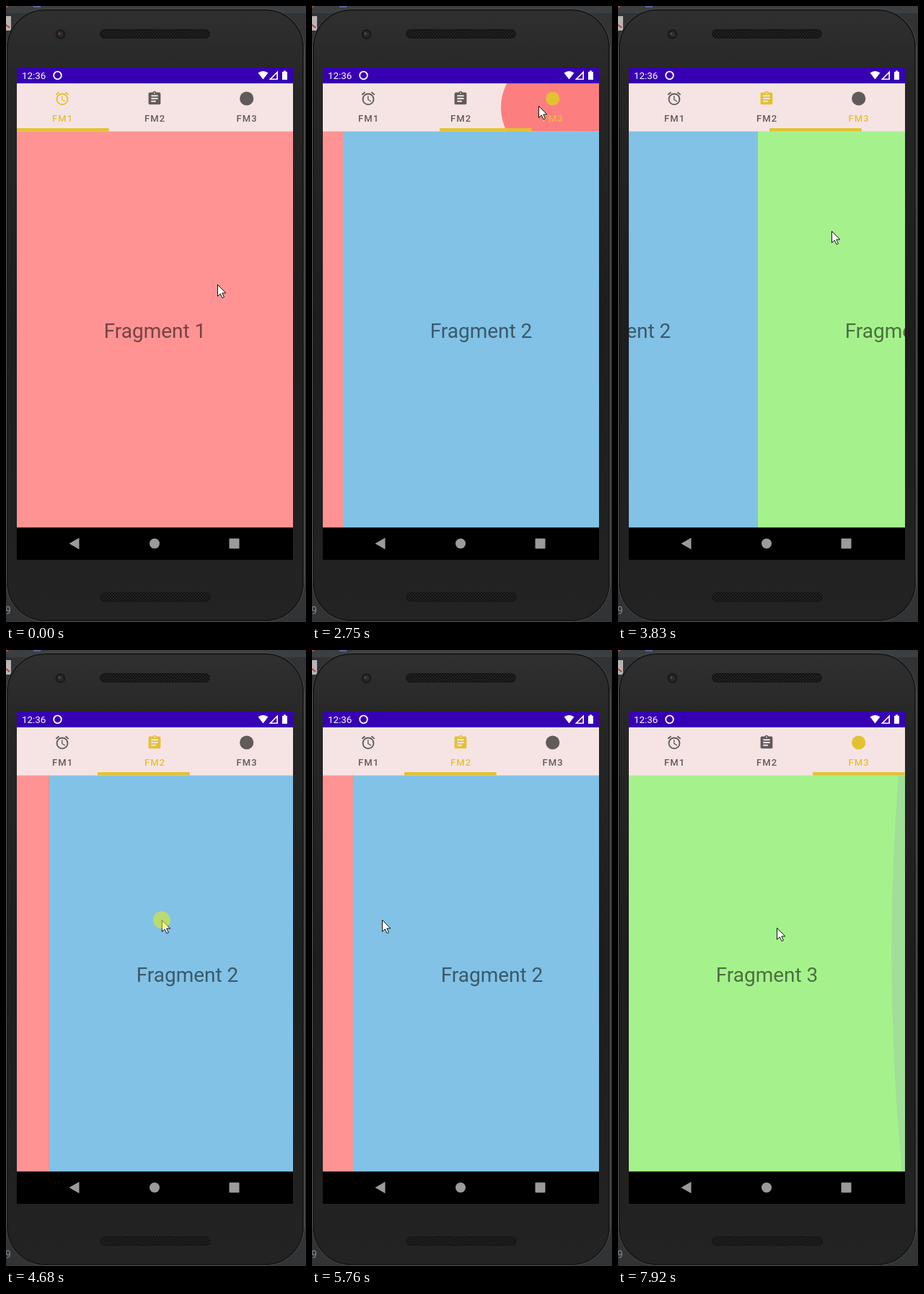
Recreate the animation shown at these times as an HTML page. Size 416x852 px, loop 8000 ms.

```html
<!DOCTYPE html>
<html lang="en">
<head>
<meta charset="utf-8">
<title>Tabbed pager</title>
<style>
  html, body { margin: 0; width: 100%; height: 100%; overflow: hidden; background: #313335; }
  svg { display: block; width: 416px; height: 852px; font-family: Roboto, sans-serif; }
  .page text { font-size: 28px; text-anchor: middle; fill: rgba(0,0,0,.54); }
  .label { font-size: 13px; font-weight: 500; letter-spacing: 1.1px; text-anchor: middle; }
</style>
</head>
<body>
<svg viewBox="0 0 416 852">
  <defs>
    <linearGradient id="body" x2="0" y2="1">
      <stop offset="0" stop-color="#303030"/>
      <stop offset=".12" stop-color="#262626"/>
      <stop offset=".5" stop-color="#1d1d1d"/>
      <stop offset="1" stop-color="#232323"/>
    </linearGradient>
    <pattern id="mesh" width="4" height="4" patternUnits="userSpaceOnUse">
      <rect width="4" height="4" fill="#222"/>
      <circle cx="1" cy="1" r="1" fill="#0c0c0c"/>
      <circle cx="3" cy="3" r="1" fill="#0c0c0c"/>
    </pattern>
    <clipPath id="pagesClip"><rect x="15" y="173.500" width="383" height="548"/></clipPath>
    <clipPath id="tabsClip"><rect x="15" y="107" width="383" height="66.500"/></clipPath>
  </defs>

  <!-- desktop and phone -->
  <rect width="416" height="852" fill="#313335"/>
  <rect width="416" height="10" fill="#3c3f41"/>
  <rect y="14" width="7" height="20" fill="#b9b4b4"/>
  <path d="M0 1h3M0 26l5 4" stroke="#b5453c" stroke-width="2"/>
  <path d="M38 1h10" stroke="#5868a8" stroke-width="2"/>
  <text x="-1" y="841" font-size="14" fill="#85888a">9</text>
  <rect x=".5" y="4" width="413" height="847.500" rx="54" fill="url(#body)" stroke="#5a5a5a"/>
  <rect x="2" y="5.500" width="410" height="844.500" rx="52" fill="none" stroke="#191919" stroke-width="2"/>
  <circle cx="75.500" cy="39" r="7" fill="#1c1c1c"/>
  <circle cx="75.500" cy="39" r="4" fill="#30282c"/>
  <circle cx="74" cy="38" r="1.500" fill="#594b50"/>
  <g fill="url(#mesh)" stroke="#151515">
    <rect x="130.500" y="32.500" width="152" height="12" rx="6"/>
    <rect x="130.500" y="811.500" width="153" height="12" rx="6"/>
  </g>

  <!-- status bar -->
  <rect x="15" y="85" width="383" height="22" fill="#3700b3"/>
  <g fill="#fff">
    <text x="22" y="101" font-size="13.400">12:36</text>
    <circle cx="71.500" cy="96" r="5.300" fill="none" stroke="#fff" stroke-width="1.800"/>
    <path d="M349.500 92.500q7-5 14 0l-7 9z"/>
    <path d="M375.300 93.500v7h-7zM377 89.500v12.500h-12.500z" fill-rule="evenodd"/>
    <path d="M383 91h2v-1.500h3v1.500h2v11h-7z"/>
  </g>

  <!-- tabs -->
  <rect x="15" y="107" width="383" height="67" fill="#f6e4e4"/>
  <circle id="ripple" cx="334" cy="140.500" fill="#fc7e7e" clip-path="url(#tabsClip)"/>
  <g transform="translate(66.800 116.800) scale(.932)"><path class="icon" d="M22 5.720l-4.600-3.860-1.290 1.530 4.600 3.860zM7.880 3.390L6.600 1.860 2 5.710l1.290 1.530zM12.500 8H11v6l4.750 2.850.75-1.230-4-2.370zM12 4a9 9 0 1 0 0 18a9 9 0 0 0 0-18zm0 16a7 7 0 1 1 0-14a7 7 0 0 1 0 14z"/></g>
  <g transform="translate(194.800 116.800) scale(.932)"><path class="icon" fill-rule="evenodd" d="M19 3h-4.180a3 3 0 0 0-5.640 0H5a2 2 0 0 0-2 2v14a2 2 0 0 0 2 2h14a2 2 0 0 0 2-2V5a2 2 0 0 0-2-2zM12 3a1 1 0 0 1 0 2a1 1 0 0 1 0-2zM14 17H7v-2h7zM17 13H7v-2h10zM17 9H7V7h10z"/></g>
  <circle class="icon" cx="333.700" cy="128" r="9.600"/>
  <text class="label" x="78.600" y="160">FM1</text>
  <text class="label" x="206.600" y="160">FM2</text>
  <text class="label" x="334.200" y="160">FM3</text>

  <!-- pages -->
  <g clip-path="url(#pagesClip)">
    <g id="pages"></g>
    <path id="glow" d="M0 0H-9Q-30.500 274-4 548H0z" fill="rgba(140,165,185,.24)"/>
  </g>
  <rect id="indicator" y="169" width="127.670" height="4.500" fill="#e2c233"/>

  <!-- navigation bar -->
  <rect x="15" y="721.500" width="383" height="44.500" fill="#000"/>
  <g fill="#9b9b9b">
    <path d="M87.500 743.500L101.500 735.500V751.500z"/>
    <circle cx="206" cy="743.500" r="7"/>
    <rect x="309.500" y="736.500" width="14" height="14" rx="1"/>
  </g>

  <g id="pointer">
    <path d="M.5.5V16.500l3.700-3.500 2.800 5.700 2.500-1.100-2.700-5.600h5z" fill="#fff" stroke="#111"/>
    <circle id="touch" r="12" fill="rgba(242,242,0,.5)"/>
  </g>
</svg>

<script>
const LOOP = 8000, PAGE_W = 383, LEFT = 15, LAST_PAGE = 2;
const TRAVEL = 400, SETTLE = 300, TAP_SCROLL = 315, TAP_MARKER = 253, LABEL_LAG = 30;

const $ = id => document.getElementById(id);
const set = (el, attrs) => { for (const k in attrs) el.setAttribute(k, attrs[k]); };
const mix = (a, b, u) => a + (b - a) * u;
const progress = (t, start, length) => Math.min(1, Math.max(0, (t - start) / length));
const smooth = u => u * u * (3 - 2 * u);
const slowDown = u => 1 - (1 - u) ** 3;

// Pointer strokes; those with a page press the screen and end on that page.
const strokes = [
  { start: 600, end: 1440, from: [293, 385], to: [310, 141] },
  { start: 2220, end: 2370, from: [318, 96], to: [320, 132] },
  { start: 2520, end: 2600, from: [314, 138], to: [314, 138], page: 2, tap: true },
  { start: 3480, end: 3828, from: [117, 322], to: [296, 311], page: 1 },
  { start: 4590, end: 4800, from: [171, 375], to: [296, 370], page: 0 },
  { start: 5400, end: 5637, from: [296, 370], to: [97, 373], page: 1 },
  { start: 6790, end: 7022, from: [283, 390], to: [62, 387], page: 2 },
  { start: 7600, end: 7770, from: [284, 392], to: [82, 398], page: 2 },
  { start: 7909, end: LOOP, from: [220, 384], to: [220, 384] }
];
const touches = strokes.filter(s => 'page' in s);
const tap = touches.find(s => s.tap);
const overscroll = touches[touches.length - 1];

// Between strokes the pointer rests, then travels to the next start.
function pointerAt(t) {
  const next = strokes.findIndex(s => t <= s.end);
  const { start, end, from, to } = strokes[next];
  if (t >= start) {
    const u = smooth(progress(t, start, end - start));
    return from.map((v, i) => mix(v, to[i], u));
  }
  const previous = strokes[next - 1];
  if (!previous) return from;
  const travel = Math.min(TRAVEL, start - previous.end);
  const u = smooth(progress(t, start - travel, travel));
  return previous.to.map((v, i) => mix(v, from[i], u));
}

// A swipe drags the pages with the pointer, then they settle on a page.
function scrollAt(t) {
  let scroll = 0;
  for (const s of touches) {
    if (t < s.start) break;
    const dragged = s.from[0] - pointerAt(Math.min(t, s.end))[0];
    scroll = Math.min(LAST_PAGE * PAGE_W, scroll + dragged);
    const u = s.tap ? smooth(progress(t, s.end, TAP_SCROLL)) : slowDown(progress(t, s.end, SETTLE));
    scroll = mix(scroll, s.page * PAGE_W, u);
  }
  return scroll;
}

const selectedAt = t => touches.reduce((page, s) => t >= s.end ? s.page : page, 0);

$('pages').innerHTML = ['#ff9393', '#81c2e6', '#a5f28c'].map((color, i) =>
  `<g class="page" transform="translate(${LEFT + i * PAGE_W} 173)">
    <rect width="${PAGE_W}" height="549" fill="${color}"/>
    <text x="191.500" y="285.500">Fragment ${i + 1}</text></g>`).join('');
const icons = document.querySelectorAll('.icon');
const labels = document.querySelectorAll('.label');

function paint(items, selected) {
  items.forEach((el, i) => set(el, { fill: i === selected ? '#e2c233' : '#615a5a' }));
}

function draw(t) {
  const scroll = scrollAt(t);
  const tapping = t >= tap.end && t < tap.end + TAP_SCROLL;
  const marker = tapping
    ? smooth(progress(t, tap.end, TAP_MARKER)) * tap.page * PAGE_W
    : scroll;
  set($('pages'), { transform: `translate(${-Math.floor(scroll)} 0)` });
  set($('indicator'), { x: Math.floor(LEFT + marker / 3) });

  paint(icons, selectedAt(t));
  paint(labels, selectedAt(t - LABEL_LAG));

  set($('ripple'), {
    r: mix(20, 72, slowDown(progress(t, tap.start, 230))),
    opacity: t < tap.start ? 0 : 1 - progress(t, tap.end + 220, 300)
  });
  const pull = slowDown(progress(t, overscroll.start, 300));
  set($('glow'), { transform: `translate(398 173.500) scale(${pull} 1)` });

  set($('pointer'), { transform: `translate(${pointerAt(t)})` });
  set($('touch'), { opacity: touches.some(s => t >= s.start && t < s.end) ? 1 : 0 });
}

function frame() {
  const t = performance.now() % LOOP;
  draw(t < 440 ? 0 : 440 + Math.floor((t - 440) / 77) * 77);
  requestAnimationFrame(frame);
}
frame();
</script>
</body>
</html>
```
